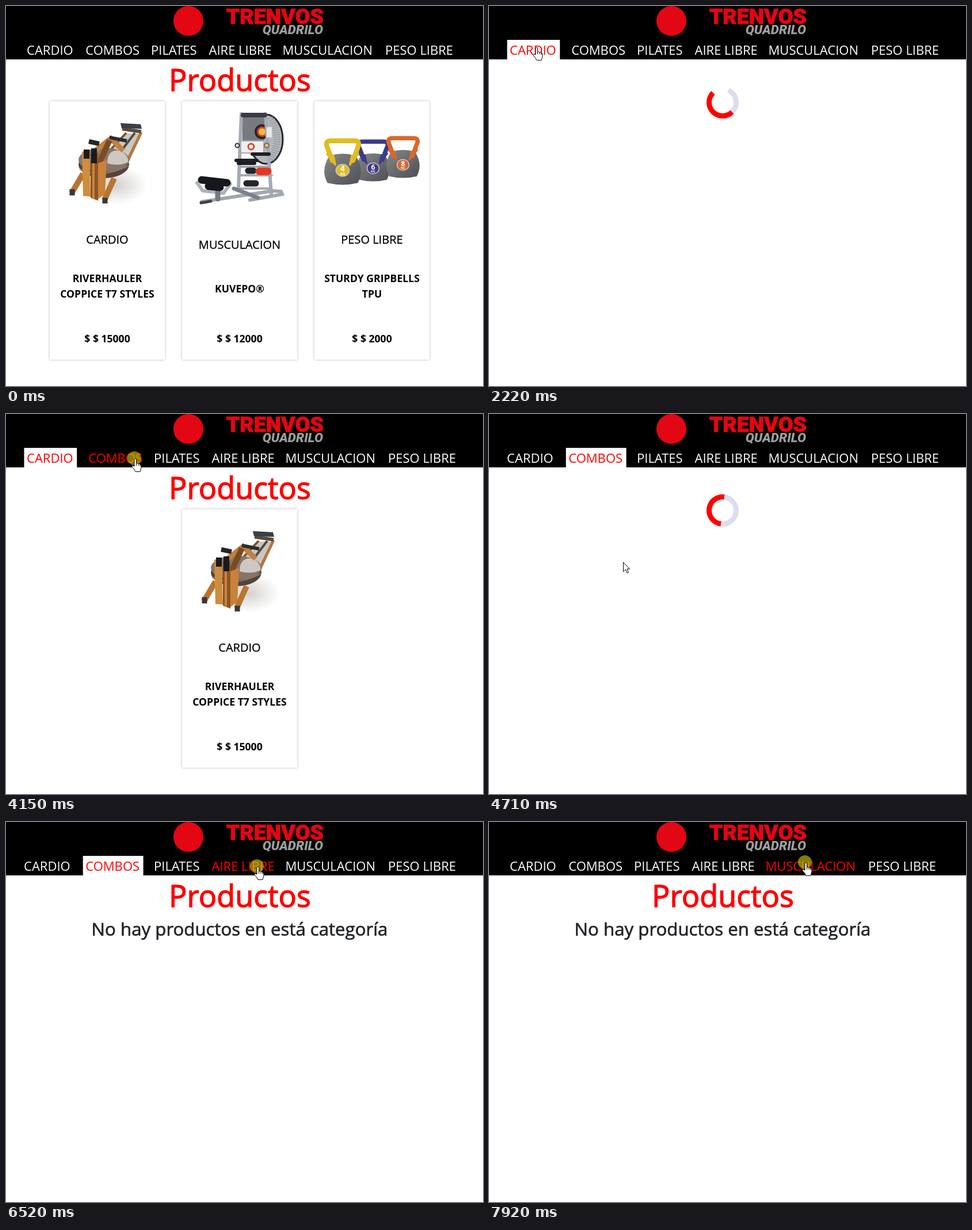
Animation of 829 by 662 pixels, one loop 7990 ms. Source, as an HTML page:

```html
<!DOCTYPE html>
<html lang="es">
<head>
<meta charset="utf-8">
<title>Productos</title>
<style>
  html, body { margin: 0; width: 100%; height: 100%; overflow: hidden; background: #fff; }
  svg { display: block; width: 829px; height: 662px; font-family: 'Open Sans', sans-serif; }
  #nav { font-size: 22px; }
  /* a thin outline gives the medium weight */
  #title { font-size: 52.2px; fill: red; stroke: red; stroke-width: 1.3; }
  #empty { font-size: 31.2px; fill: #212529; stroke: #212529; stroke-width: .7; }
  .card rect.frame { fill: #fff; filter: drop-shadow(0 0 2px #0004); }
  .kind { font-size: 20px; stroke: #000; stroke-width: .3; }
  .name { font-size: 17.6px; font-weight: 700; }
  .brand { font-family: Roboto, sans-serif; font-weight: 900; }
  .mid { text-anchor: middle; }
</style>
</head>
<body>
<svg viewBox="0 0 829 662">
  <defs>
    <linearGradient id="iron" x2="1" y2="1">
      <stop stop-color="#85878b"/><stop offset="1" stop-color="#4d4f53"/>
    </linearGradient>
    <radialGradient id="floor">
      <stop stop-color="#d2d0ce"/><stop offset="1" stop-color="#fff"/>
    </radialGradient>

    <g id="rower" fill="none">
      <ellipse cx="190" cy="312" rx="56" ry="34" fill="url(#floor)"/>
      <path d="M207 222H236L212 276L180 252Z" fill="#c9c6c4"/>
      <path d="M209 221L180 252" stroke="#7a5330" stroke-width="4"/>
      <path d="M224 221L196 258" stroke="#54493f" stroke-width="4"/>
      <path d="M235 220L211 270" stroke="#b5763a" stroke-width="5"/>
      <path d="M202 214L235 219" stroke="#5b4a3c" stroke-width="6"/>
      <path d="M199 204L234 206L236 214L201 213Z" fill="#3a3f48"/>
      <ellipse cx="170" cy="276" rx="44" ry="24" fill="#54443a"/>
      <ellipse cx="170" cy="268" rx="44" ry="21" fill="#85766c"/>
      <path d="M176 274Q176 248 200 252Q214 262 212 272Q196 280 176 274Z" fill="#cfc8c2"/>
      <path d="M128 284Q168 302 213 278" stroke="#96755b" stroke-width="2"/>
      <path d="M150 256L182 231L204 252" stroke="#c08040" stroke-width="9"/>
      <path d="M180 234L160 278" stroke="#7d4a21" stroke-width="10"/>
      <path d="M180 229L210 235" stroke="#2a2c30" stroke-width="6"/>
      <path d="M144 236L162 240" stroke="#24262a" stroke-width="8"/>
      <path d="M134 292L114 326M188 300L171 338" stroke="#b9752f" stroke-width="10"/>
      <path d="M132 254L145 250L147 332L134 331Z" fill="#cf8d40"/>
      <path d="M147 256H160V339L147 334Z" fill="#8e5424"/>
      <path d="M150 272H154V335H150Z" fill="#c8853c"/>
      <path d="M160 274L175 268L172 328L160 336Z" fill="#c88239"/>
      <path d="M140 250V266M153 248V274" stroke="#191a1d" stroke-width="10"/>
      <path d="M115 319V330M172 334V344" stroke="#3b3937" stroke-width="9"/>
    </g>

    <g id="machine" stroke-linecap="round" fill="none">
      <ellipse cx="452" cy="232" rx="29" ry="43" fill="#b4b7bb" stroke="#26282b" stroke-width="3"/>
      <path d="M460 194Q482 230 460 270" stroke="#8b8f94" stroke-width="12" stroke-dasharray="1 3" stroke-linecap="butt"/>
      <path d="M411 194H449V236H411Z" fill="#777b80"/>
      <circle cx="445" cy="219" r="13" fill="#24262a"/><circle cx="445" cy="219" r="9" fill="#df3c26"/>
      <circle cx="445" cy="219" r="6" fill="#f4bd35"/>
      <path d="M409 188L404 318M451 188L461 328" stroke="#a5abb4" stroke-width="6"/>
      <path d="M412 190H450" stroke="#3a3d42" stroke-width="8"/>
      <path d="M408 235H448V256H408Z" fill="#eceef0" stroke="#a5abb4" stroke-width="2"/>
      <path d="M453 211H462V229H453Z" fill="#e5e7e9"/>
      <circle cx="426" cy="245" r="5" fill="#fff" stroke="#e4452d" stroke-width="3"/>
      <circle cx="402" cy="243" r="3.500" stroke="#303238" stroke-width="2"/>
      <circle cx="453" cy="243" r="4" fill="#f3bc51" stroke="#686b70" stroke-width="2"/>
      <path d="M400 269H436M404 274H432M428 258H457" stroke="#1d1f23" stroke-width="6"/>
      <path d="M406 280H458M406 295H462M405 318H460" stroke="#a5abb4" stroke-width="4"/>
      <path d="M421 287H430M418 309H434" stroke="#24262a" stroke-width="11"/>
      <path d="M440 288H455" stroke="#e53624" stroke-width="13"/>
      <path d="M340 341L464 322L478 323L480 328L424 338" stroke="#a1a7b0" stroke-width="6"/>
      <path d="M396 318L438 334" stroke="#7b828c" stroke-width="7"/>
      <path d="M332 308L342 322L378 326L390 310" stroke="#aeb3bb" stroke-width="6"/>
      <path d="M368 324V336" stroke="#747a83" stroke-width="9"/>
      <path d="M340 303L384 308M352 314L372 316" stroke="#16181c" stroke-width="13"/>
      <path d="M339 343L356 340" stroke="#3f434a" stroke-width="5"/>
    </g>

    <g id="bells"></g>
  </defs>

  <g id="results"></g>
  <text id="title" class="mid" x="406.5" y="147.5">Productos</text>
  <text id="empty" class="mid" x="406" y="198">No hay productos en está categoría</text>
  <g id="spinner" fill="none" stroke-width="9">
    <path id="track" stroke="#dcddef"/>
    <path id="arc" stroke="red"/>
  </g>

  <path d="M0 0H829V93H0Z"/>
  <circle cx="317" cy="26" r="26" fill="#e30613"/>
  <g class="brand" text-anchor="end">
    <text x="552" y="31" font-size="37.5" fill="#e30613" stroke="#e30613">TRENVOS</text>
    <text x="551" y="49" font-size="22.5" font-style="italic" fill="#9d9d9c">QUADRILO</text>
  </g>
  <g id="nav"></g>

  <g id="cursor">
    <circle id="press" r="12" fill="#ff0" fill-opacity=".5"/>
    <path id="arrow" fill="#fff" stroke="#000" d="M.5 .5V16.5L4.5 13L7 19L9.5 18L7 12H11.5Z"/>
    <path id="hand" fill="#fff" stroke="#000" stroke-linejoin="round"
      d="M0 2Q1.5 -.5 3.5 2V9Q6 7 7 10Q9 8 10 11Q12 10 12 13V17Q11 20 10 23.500H2Q0 19 -4 15Q-5 11 0 14ZM3.500 9V13M7 10V13M10 11V14"/>
  </g>
</svg>
<script>
const $ = id => document.getElementById(id);
const show = (el, on) => el.setAttribute('display', on ? 'inline' : 'none');

// Kettlebells, back to front
const bell = (x, y, size, color, digit) => `
  <g transform="translate(${x} ${y}) scale(${size})">
    <path d="M-22-20Q0-27 22-20Q37 4 25 25Q0 31-25 25Q-37 4-22-20" fill="url(#iron)"/>
    <path d="M-26-23L-12-5L-15-20ZM26-23L12-5L15-20Z" fill="${color}"
      stroke="${color}" stroke-width="3" stroke-linejoin="round"/>
    <path d="M-17-12L-26-36Q-29-45-19-45H19Q29-45 26-36L17-12" fill="none"
      stroke="${color}" stroke-width="8" stroke-linecap="round"/>
    <ellipse cy="4" rx="11" ry="10" fill="${color}" stroke="#c9cacc" stroke-width="1.5"/>
    <g class="mid" fill="#fff" font-weight="700">
      <text y="6" font-size="13">${digit}</text><text y="12" font-size="6">KG</text>
    </g>
  </g>`;
$('bells').innerHTML = bell(638, 279, .95, '#3b3a8c', 6) +
  bell(690, 273, .95, '#d9682c', 8) + bell(585, 282, 1.05, '#e0bd20', 4);

const line = (y, cls, text) => `<text class="mid ${cls}" x="100" y="${y}">${text}</text>`;
const card = (x, picture, homeX, kind, kindY, names, price) => `
  <g class="card" transform="translate(${x})">
    <rect class="frame" y="166" width="200" height="450"/>
    <use href="#${picture}" x="${-homeX}"/>
    ${line(kindY, 'kind', kind)}
    ${names.map((n, i) => line((names.length > 1 ? 481 : 499) + 27 * i, 'name', n)).join('')}
    ${line(586, 'name', '$ $ ' + price)}
  </g>`;
const rowerCard = x => card(x, 'rower', 76, 'CARDIO', 414, ['RIVERHAULER', 'COPPICE T7 STYLES'], 15000);
const views = {
  all: rowerCard(76) +
    card(306, 'machine', 306, 'MUSCULACION', 423, ['KUVEPO®'], 12000) +
    card(536, 'bells', 536, 'PESO LIBRE', 414, ['STURDY GRIPBELLS', 'TPU'], 2000),
  cardio: rowerCard(306)
};
$('results').innerHTML = Object.entries(views)
  .map(([id, html]) => `<g id="${id}">${html}</g>`).join('');

// Navigation
const items = [['CARDIO', 36], ['COMBOS', 138.2], ['PILATES', 252],
  ['AIRE LIBRE', 352.5], ['MUSCULACION', 480.5], ['PESO LIBRE', 659]];
$('nav').innerHTML = items.map(([label]) =>
  `<g><rect y="59" height="34" fill="#fff"/><text y="85">${label}</text></g>`).join('');
const links = [...$('nav').children].map((g, i) => {
  const [box, text] = g.children;
  return { box, text, x: items[i][1], width: text.getComputedTextLength() };
});

// Timeline
const LOOP = 7990, PRESS = 140, LOAD = 700;
const clicks = [
  { at: 1700, active: 0, view: 'cardio' },
  { at: 4120, active: 1, view: 'empty' },
  { at: 6520, active: -1, view: 'empty' },
  { at: 7900 }
];
const route = [
  [330, 643, 662], [1100, 120, 175], [1500, 79, 70], [1900, 79, 70],
  [2150, 81, 71], [3000, 81, 71], [3300, 200, 140], [3700, 300, 78],
  [3950, 223, 77], [4300, 223, 77], [4710, 233, 258], [5000, 255, 450],
  [5480, 405, 330], [6000, 436, 77], [6660, 436, 77], [7000, 440, 200],
  [7600, 549, 70], [LOOP, 549, 70]
];

function pointer(t) {
  const i = Math.max(1, route.findIndex(p => p[0] > t));
  const [t0, x0, y0] = route[i - 1], [t1, x1, y1] = route[i];
  const u = Math.max(0, (t - t0) / (t1 - t0)), k = u * u * (3 - 2 * u);
  return [x0 + (x1 - x0) * k, y0 + (y1 - y0) * k];
}

function arcPath(from, sweep) {
  const at = deg => {
    const a = deg * Math.PI / 180;
    return `${406 + 23.5 * Math.cos(a)} ${168 + 23.5 * Math.sin(a)}`;
  };
  return `M${at(from)}A23.5 23.5 0 0 ${sweep > 0 ? 1 : 0} ${at(from + sweep)}`;
}

function draw(t) {
  const last = clicks.filter(c => c.view && t >= c.at + PRESS).pop();
  const loading = !!last && t < last.at + PRESS + LOAD;
  const active = last ? last.active : -1;
  const view = loading ? '' : last ? last.view : 'all';
  for (const id of ['all', 'cardio', 'empty']) show($(id), id === view);
  show($('title'), !loading);
  show($('spinner'), loading);
  if (loading) {
    const angle = 45 + (t - 2220) / 792 * 360;
    $('arc').setAttribute('d', arcPath(angle, 179.9));
    $('track').setAttribute('d', arcPath(angle, last === clicks[0] ? -110 : -179.9));
  }

  const [px, py] = pointer(t);
  let overLink = false;
  links.forEach(({ box, text, x, width }, i) => {
    const left = x + (active < 0 ? 0 : 5 * Math.sign(i - active));
    const hover = t >= 330 && py > 59 && py < 93 && px > left - 5 && px < left + width + 5;
    overLink ||= hover;
    text.setAttribute('x', left);
    text.setAttribute('fill', hover || i === active ? 'red' : '#fff');
    box.setAttribute('x', left - 4.5);
    box.setAttribute('width', width + 11);
    show(box, i === active);
  });

  $('cursor').setAttribute('transform', `translate(${px} ${py})`);
  show($('cursor'), t >= 330);
  show($('hand'), overLink);
  show($('arrow'), !overLink);
  show($('press'), clicks.some(c => t >= c.at && t < c.at + PRESS));
}

function tick() {
  draw(performance.now() % LOOP);
  requestAnimationFrame(tick);
}
tick();
</script>
</body>
</html>
```
